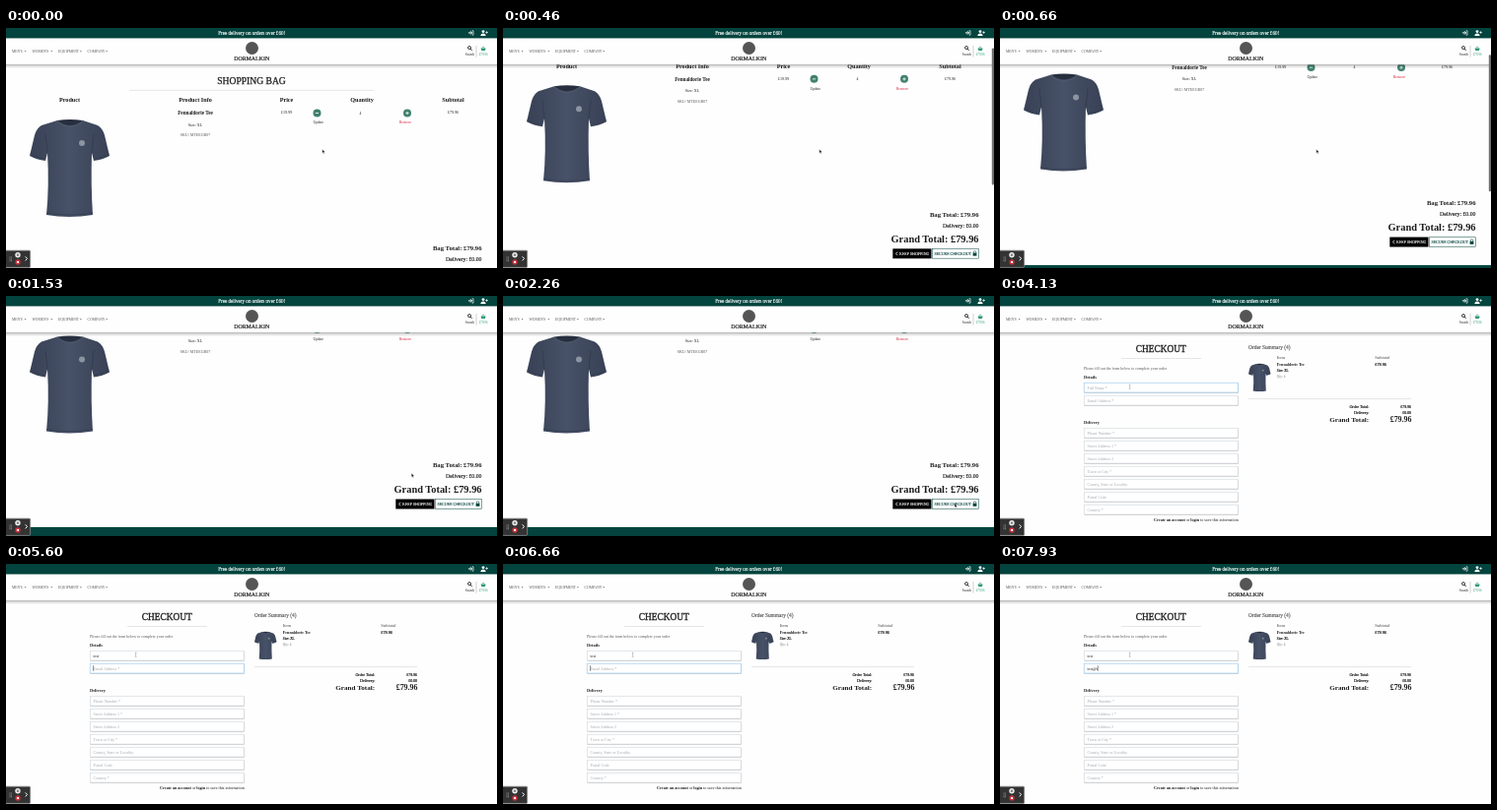
These frames come from a looping animation (498x244 px, 8 s). An HTML page:

```html
<!DOCTYPE html>
<html lang="en">
<head>
<meta charset="utf-8">
<title>Shopping bag to checkout</title>
<style>
html, body { margin: 0; width: 100%; height: 100%; overflow: hidden; background: #fefefe; }
svg { display: block; width: 498px; height: 244px; }
text { font-family: "Liberation Serif", "Times New Roman", serif; white-space: pre; }
</style>
</head>
<body>
<svg id="stage" viewBox="0 0 498 244"></svg>
<script>
const GREEN = '#03443e', INK = '#1c1c1c', GREY = '#777', HINT = '#a3a8ad';
const EDGE = '#c9d2da', GLOW = '#a3cdf0';
const SHOP = 'DORMALKIN', ITEM = 'Fennaldorie Tee';

// a: anchor, b: weight, c: colour, w: outline that thickens the letters
const text = (s, x, y, size, { a = 'start', b = 400, c = INK, id = '', w = 0 } = {}) =>
  `<text id="${id}" x="${x}" y="${y}" font-size="${size}" text-anchor="${a}" font-weight="${b}" fill="${c}"${w ? ` stroke="${c}" stroke-width="${w}"` : ''}>${s}</text>`;
const mid = (s, x, y, size, o) => text(s, x, y, size, { a: 'middle', ...o });
const end = (s, x, y, size, o) => text(s, x, y, size, { a: 'end', ...o });
const rect = (x, y, w, h, fill, more = '') =>
  `<rect x="${x}" y="${y}" width="${w}" height="${h}" fill="${fill}" ${more}/>`;
const dot = (x, y, r, fill) => `<circle cx="${x}" cy="${y}" r="${r}" fill="${fill}"/>`;
const path = (d, fill, stroke = 'none', w = 1) =>
  `<path d="${d}" fill="${fill}" stroke="${stroke}" stroke-width="${w}"/>`;
const line = (d, stroke, w) => path(d, 'none', stroke, w);
const bold = { b: 700 }, medium = { w: .16 };

const shirt = `
  ${path('M52 94Q64.5 99 78 94L93 99Q98 102 100 109L105 130Q98 134 89 135L87 127Q86 160 88 190Q64 194 41 190Q44 160 42 127L40 135Q31 134 24 130L29 109Q31 102 36 99Z', 'url(#cloth)')}
  ${path('M52 94Q64.5 92 78 94Q65 104 52 94Z', '#272f3f')}
  ${line('M51 94.5Q64.5 106 79 94.5', '#525b6d', .8)}
  ${line('M42 127L40 108M87 127L89 108', '#303a4c', .8)}
  ${line('M24.5 128Q32 132 40 133M104.5 128Q98 132 89 133M41 188Q64 192 88 188', '#333c4e', .6)}
  ${dot(77, 117, 3, '#8c94a2')}`;

// Bag page, in page coordinates
const heads = [['Product', 64.5], ['Product Info', 192], ['Price', 284.5], ['Quantity', 361], ['Subtotal', 453.5]];
const bag = `
  ${mid('SHOPPING BAG', 249, 57, 9.6, { w: .25 })}
  ${line('M125 63.3H373', '#ccc', .5)}
  ${heads.map(([s, x]) => mid(s, x, 75.2, 6.2, bold)).join('')}
  ${shirt}
  ${mid(ITEM, 192, 88.2, 5.2, bold)}
  ${mid('Size: XL', 192, 99.8, 4)}
  ${mid('SKU: MTEEGR07', 192, 110.3, 4, { c: '#555' })}
  ${mid('£19.99', 284.5, 87.2, 4.1)}
  ${mid('4', 359.5, 87.8, 3.8)}
  ${mid('£79.96', 453.5, 87.2, 4.1)}
  ${dot(315.5, 86.5, 4, '#42806f')}${dot(407, 86.5, 4, '#42806f')}
  ${line('M313.9 86.5h3.2M405.4 86.5h3.2M407 84.9v3.2', '#fff', .8)}
  ${mid('Update', 316.8, 97.4, 3.7)}
  ${mid('Remove', 405, 97.4, 3.7, { c: '#d8203c' })}
  ${end('Bag Total: £79.96', 482.5, 226.2, 6.7, bold)}
  ${end('Delivery: £0.00', 482.5, 237.4, 5.8, medium)}
  ${end('Grand Total: £79.96', 482.5, 252.8, 10.36, bold)}
  ${rect(395.3, 259, 39.2, 10, '#000')}
  ${line('M400.2 262.3l-1.7 1.7l1.7 1.7', '#fff', .8)}
  ${text('KEEP SHOPPING', 402, 265.4, 4, { c: '#fff', w: .1 })}
  <g id="pay">
    ${rect(435.6, 259.2, 46.7, 9.6, '#fff', `id="payBox" stroke="${GREEN}" stroke-width=".5"`)}
    ${text('SECURE CHECKOUT', 437.5, 265.4, 3.95, { c: 'currentColor', w: .1 })}
    ${rect(476.6, 263.3, 3.8, 3, 'currentColor')}
    ${line('M477.3 263.5v-1a1.2 1.2 0 0 1 2.4 0v1', 'currentColor', .6)}
  </g>
  ${rect(0, 287.5, 498, 140, GREEN)}`;

// Checkout page
const fields = [
  ['Full Name *', 88], ['Email Address *', 101], ['Phone Number *', 134], ['Street Address 1 *', 147],
  ['Street Address 2', 160], ['Town or City *', 173], ['County, State or Locality', 186],
  ['Postal Code', 199], ['Country *', 212]];
const field = ([label, y], i) => `
  ${rect(85.2, y + 1, 156.8, 9.9, '#000', 'opacity=".1" rx=".8"')}
  ${rect(85.4, y + .6, 156.3, 9.9, '#000', 'opacity=".14" rx=".6"')}
  ${rect(85.2, y + .2, 156.2, 9.8, '#fff', `id="box${i}" stroke="${EDGE}" stroke-width=".5"`)}
  ${text(label, 88.5, y + 6.5, 4.05, { c: HINT, id: 'in' + i })}`;
const checkout = `
  ${mid('CHECKOUT', 163.2, 57.4, 9.4, { w: .3 })}
  ${line('M123 63.5H204', '#ccc', .5)}
  ${text('Please fill out the form below to complete your order', 85, 74.5, 3.97, { c: '#555' })}
  ${text('Details', 85, 84.4, 4.4, bold)}
  ${text('Delivery', 85, 130.4, 4.4, bold)}
  ${fields.map(field).join('')}
  ${rect(88.5, 0, .5, 5.6, '#222', 'id="caret"')}
  ${end('<tspan font-weight="700">Create an account</tspan> or <tspan font-weight="700">login</tspan> to save this information', 241.8, 229.4, 4.1)}
  ${text('Order Summary (4)', 252, 54.2, 5.4, { c: '#555', w: .14 })}
  ${text('Item', 280.8, 63.9, 4.5, { c: '#444' })}
  ${text('Subtotal', 380.3, 63.9, 4.6, { c: '#444' })}
  <g transform="translate(252 68.8) scale(.278 .285) translate(-24 -93)">${shirt}</g>
  ${text(ITEM, 280.8, 71.1, 4.1, bold)}
  ${text('Size: XL', 280.8, 77.4, 3.3, medium)}
  ${text('Qty: 4', 280.8, 83, 3.4, { c: GREY })}
  ${text('£79.96', 380.3, 71.1, 4.2, medium)}
  ${line('M252 104.5H417', '#ccc', .5)}
  ${end('Order Total:', 374.4, 113.6, 4.1, medium)}${end('£79.96', 417, 113.6, 3.9, medium)}
  ${end('Delivery:', 374.4, 119.7, 4.1, medium)}${end('£0.00', 417, 119.7, 3.9, medium)}
  ${end('Grand Total:', 374.2, 128.3, 7.15, bold)}${end('£79.96', 417.4, 128.3, 7.9, bold)}`;

const menu = [["MEN'S", 6, 18.6], ["WOMEN'S", 26.4, 45.3], ['EQUIPMENT', 53, 74.9], ['COMPANY', 82.6, 101.1]];
const header = `
  ${[.04, .05, .07, .1].map((o, i) => rect(0, 37, 498, 4 - i, '#000', `opacity="${o}"`)).join('')}
  ${rect(0, 10, 498, 27, '#fefefe')}
  ${line('M0 37.2H498', '#bbb', .5)}
  ${rect(0, 0, 498, 10.4, GREEN)}
  ${mid('Free delivery on orders over £60!', 249.2, 6.9, 5.07, { c: '#fff', w: .14 })}
  ${menu.map(([s, x, k]) => text(s, x, 24.8, 3.65, { c: '#555' }) + path(`M${k} 22.9h2l-1 1.1z`, '#555')).join('')}
  ${dot(249.5, 20.5, 6.5, '#555')}
  ${mid(SHOP, 249.2, 33.2, 5.9, { w: .2 })}
  ${line('M469 4.9h3.4M471.1 3.3l1.6 1.6l-1.6 1.6', '#fff', 1)}
  ${line('M472.6 2.8h1.4v4.3h-1.4', '#fff', .7)}
  ${dot(484, 3.6, 1.4, '#fff')}${path('M481.4 7.9q0-2.5 2.6-2.5t2.6 2.5z', '#fff')}
  ${line('M486.3 4.5h2.6M487.6 3.2v2.6', '#fff', .7)}
  <circle cx="470" cy="20" r="1.5" fill="none" stroke="#111" stroke-width=".8"/>
  ${line('M471.1 21.1l1.6 1.6', '#111', .9)}
  ${mid('Search', 470.4, 27.6, 3.4)}
  ${line('M477 18V29.5', '#888', .4)}
  ${path('M481.6 20.5h5l-.7 2.6h-3.6z', '#2f9a74')}${line('M482.7 20.4l1.4-1.7l1.4 1.7', '#2f9a74', .6)}
  ${mid('£79.96', 484.1, 27.6, 3.2, { c: '#2f9a74' })}`;

const recorder = `
  ${rect(-1, 226.2, 25.6, 17.2, '#333', 'stroke="#8a8a8a" stroke-width=".8" rx="1"')}
  ${[233, 234.9, 236.8].map(y => dot(4, y, .5, '#aaa') + dot(5.4, y, .5, '#aaa')).join('')}
  ${dot(12, 230.7, 2.7, '#eee')}${line('M11.4 229.6v2.2M12.6 229.6v2.2', '#222', .6)}
  ${dot(12, 238, 2.7, '#c8323c')}${rect(11, 237, 2, 2, '#fff')}
  ${line('M19.7 232.4l1.8 2l-1.8 2', '#fff', 1)}`;

document.getElementById('stage').innerHTML = `
  <defs><linearGradient id="cloth">
    <stop offset="0" stop-color="#384155"/><stop offset=".5" stop-color="#475167"/><stop offset="1" stop-color="#384155"/>
  </linearGradient></defs>
  ${rect(0, 0, 498, 244, '#fefefe')}
  <g id="bag">${bag}</g><g id="checkout">${checkout}</g>
  ${header}
  ${rect(495.8, 0, 2.2, 139, '#707070', 'id="thumb" rx="1"')}
  ${recorder}
  <g id="mouse">
    ${path('M0 0V3.6L.9 2.9L1.5 4.2L2.2 3.9L1.6 2.6H2.7Z', '#111', '#fff', .25)}
  </g>
  <g id="beam">${line('M-.8 -2.3Q0 -2.3 0 -1.6V1.6Q0 2.3 -.8 2.3M.8 -2.3Q0 -2.3 0 -1.6M0 1.6Q0 2.3 .8 2.3', '#777', .4)}</g>`;

const $ = id => document.getElementById(id);
const set = (id, attrs) => { for (const k in attrs) $(id).setAttribute(k, attrs[k]); };
const show = (id, on) => { $(id).style.display = on ? '' : 'none'; };
const clamp = v => Math.min(1, Math.max(0, v));

const LOOP = 8000, CLICK = 2500, SWITCH = 3350, FOCUS = 3600, TAB = 5400;
const moves = [[1100, 320.8, 123.5], [1530, 411.3, 180.3], [1950, 458, 211], [2650, 458, 211],
  [3100, 302.5, 176.3], [SWITCH, 302.5, 176.3], [FOCUS, 131.6, 92.2]];
const keys = [
  { word: 'test', at: [4730, 4870, 4930, 5130], from: FOCUS },
  { word: 'test@t', at: [7000, 7130, 7270, 7400, 7600, 7930], from: TAB }];

function pointer(t) {
  const i = moves.findIndex(m => m[0] > t);
  if (i < 0) return moves[moves.length - 1].slice(1);
  if (!i) return moves[0].slice(1);
  const [a, b] = [moves[i - 1], moves[i]];
  const p = (t - a[0]) / (b[0] - a[0]), e = p * p * (3 - 2 * p);
  return [1, 2].map(k => a[k] + (b[k] - a[k]) * e);
}

function draw(t) {
  const scroll = 52.5 * (1 - Math.pow(1 - clamp((t - 60) / 800), 1.55));
  set('bag', { transform: `translate(0 ${-scroll})` });
  set('thumb', { y: scroll * .57 + .8, opacity: t < 60 ? 0 : clamp((1480 - t) / 200) });
  show('bag', t < SWITCH);
  show('checkout', t >= SWITCH);

  const pressed = t >= CLICK;
  $('pay').style.color = pressed ? '#8fae8c' : GREEN;
  set('payBox', { fill: pressed ? '#72a09c' : '#fff', stroke: pressed ? '#8dbbe0' : GREEN, 'stroke-width': pressed ? 1 : .5 });

  const active = t < FOCUS ? -1 : t < TAB ? 0 : 1;
  show('caret', false);
  keys.forEach(({ word, at, from }, i) => {
    const pressedAt = at.filter(k => k <= t), typed = word.slice(0, pressedAt.length);
    $('in' + i).textContent = typed || fields[i][0];
    set('in' + i, { fill: typed ? INK : HINT });
    set('box' + i, { stroke: i === active ? GLOW : EDGE, 'stroke-width': i === active ? .7 : .5 });
    if (i !== active) return;
    set('caret', { x: 88.4 + (typed ? $('in' + i).getComputedTextLength() : 0), y: fields[i][1] + 2.2 });
    show('caret', (t - Math.max(from, ...pressedAt)) % 1000 < 500);
  });

  const [x, y] = pointer(t), over = t > SWITCH && x < 241 && y < 144;
  for (const id of ['mouse', 'beam']) set(id, { transform: `translate(${x} ${y})` });
  show('mouse', !over);
  show('beam', over);
}

const start = performance.now();
function tick() {
  draw((performance.now() - start) % LOOP);
  requestAnimationFrame(tick);
}
tick();
</script>
</body>
</html>
```
